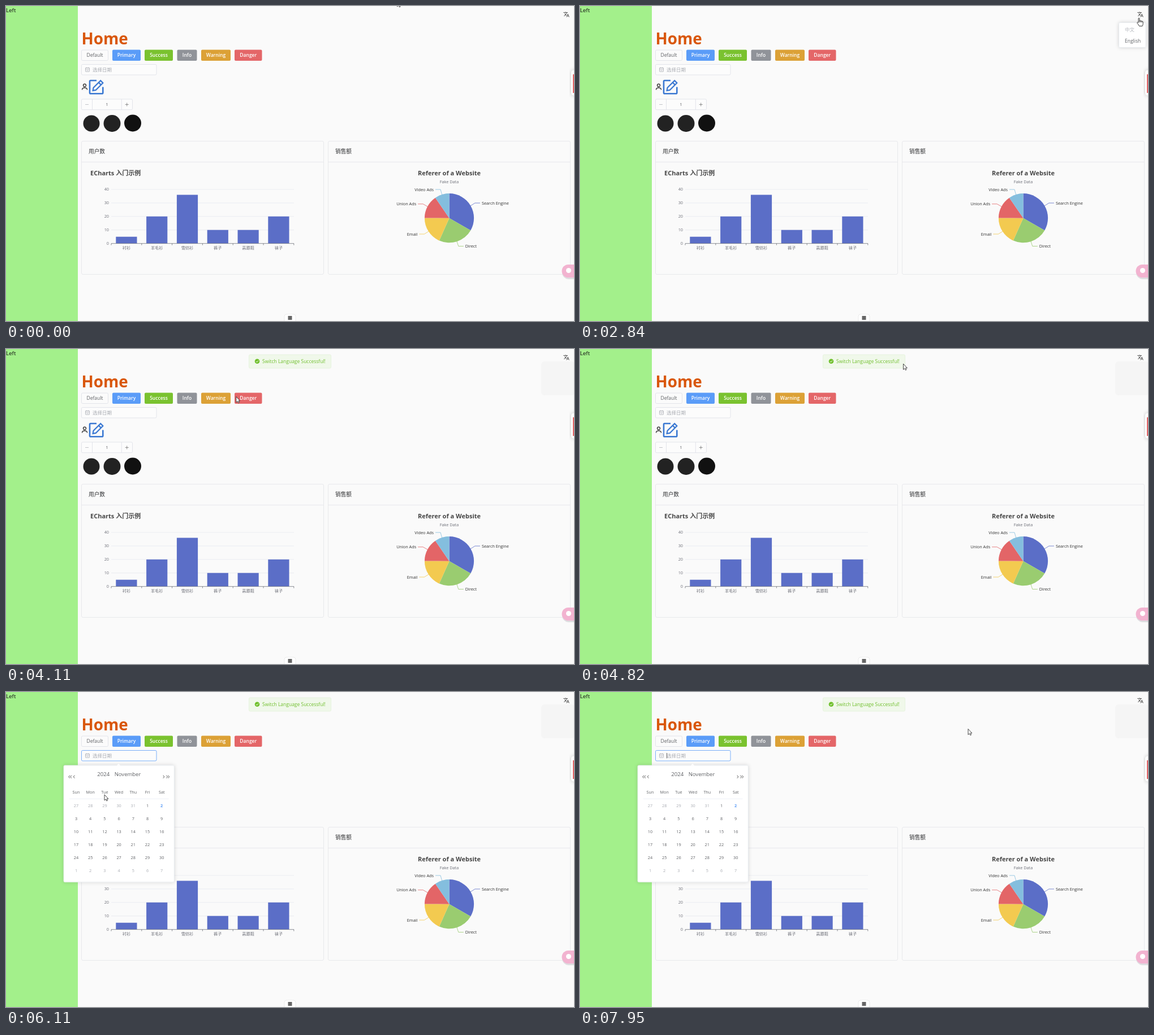
An HTML page that plays this animation: 1004x558 px, repeating every 8000 ms.

```html
<!DOCTYPE html>
<html lang="en">
<head>
<meta charset="utf-8">
<title>Home</title>
<style>
  html, body { margin: 0; width: 100%; height: 100%; overflow: hidden; background: #fafafa; }
  svg { display: block; width: 1004px; height: 558px; }
  text { font-family: "Open Sans", "Noto Sans CJK SC", "Noto Sans CJK", "Noto Sans", sans-serif; white-space: pre; }
</style>
</head>
<body>
<svg id="stage" viewBox="0 0 1004 558" fill="none">
  <defs>
    <filter id="shadow" x="-20%" y="-20%" width="140%" height="140%">
      <feDropShadow dx="0" dy="0" stdDeviation="3" flood-color="#000" flood-opacity=".16"/>
    </filter>
  </defs>
  <g id="page"></g>
  <rect id="trace" x="946" y="22" width="60" height="60" rx="6" fill="#f5f5f5"/>
  <g id="menu"></g>
  <g id="message"></g>
  <path id="caret" d="M153.5 108V117.5" stroke="#444" stroke-width=".8"/>
  <g id="picker"></g>
  <g id="cursor">
    <path id="arrow" d="M.5 .8V11L2.8 8.9 4.4 12 6 11.2 4.5 8.2H7.4Z" fill="#fff" stroke="#333" stroke-width=".9"/>
    <path id="hand" d="M-.9 8V1.2Q-.9 .3 0 .3T1 1.2V5Q2.3 4.4 3.1 5.4 4.4 5 5.2 6 7.2 5.8 7.2 7.5V10.5Q7.2 12.5 6 14.6H.5Q-.8 12-3 9.3-3.5 8-2.4 7.6-1.6 7.4-.9 8.8M1 5V8M3.1 5.4V8M5.2 6V8.3" fill="#fff" stroke="#222" stroke-width=".9"/>
    <path id="beam" d="M-1.5 -5H1.5M0 -5V5M-1.5 5H1.5" stroke="#333" stroke-width=".8"/>
    <g id="denied" stroke="#cf2027" stroke-width="1.5"><circle cx="0" cy="0" r="4.3" fill="#fff"/><path d="M-3 -3L3 3"/></g>
  </g>
</svg>
<script>
const $ = id => document.getElementById(id);
const LOOP = 8000, GREY = '#606266', LINE = '#e4e5e9', BLUE = '#5a9cf8';

// (x, y) is the anchor and the vertical middle of the capitals
const text = (x, y, s, size, fill = GREY, anchor = 'start', weight = 400) =>
  `<text x="${x}" y="${y + size * .36}" font-size="${size}" fill="${fill}" text-anchor="${anchor}" font-weight="${weight}">${s}</text>`;
const rect = (x, y, w, h, fill, stroke = 'none', r = 0, extra = '') =>
  `<rect x="${x}" y="${y}" width="${w}" height="${h}" rx="${r}" fill="${fill}" stroke="${stroke}" stroke-width=".8" ${extra}/>`;
const path = (d, stroke, width = .8, fill = 'none') =>
  `<path d="${d}" stroke="${stroke}" stroke-width="${width}" fill="${fill}"/>`;
const circle = (x, y, r, fill) => `<circle cx="${x}" cy="${y}" r="${r}" fill="${fill}"/>`;

function controls() {
  const buttons = [
    ['Default', 133, 48], ['Primary', 188, 50, BLUE], ['Success', 245, 50, '#7ac22f'],
    ['Info', 302.5, 35, '#909399'], ['Warning', 345, 52, '#dca136'], ['Danger', 404, 48.5, '#e46668']
  ];
  return buttons.map(([s, x, w, c]) =>
      (c ? rect(x, 77.5, w, 19.5, c, 'none', 2) : rect(x + .5, 78, w - 1, 18.5, '#fbfbfb', '#dcdfe6', 2)) +
      text(x + w / 2, 87.4, s, 8.5, c ? '#fff' : GREY, 'middle', c ? 600 : 500)).join('') +
    rect(133.5, 103.5, 132.5, 18.5, '#fcfcfc', '#dcdfe6', 2, 'id="input"') +
    rect(140.5, 109.5, 7, 6.7, 'none', '#a8abb2', .5) +
    path('M140.5 111.8H147.5M142.3 108.5V110M145.7 108.5V110M142 114H146', '#a8abb2', .7) +
    text(153, 112.7, '选择日期', 8.5, '#a8abb2') +
    `<circle cx="139" cy="140.6" r="2.5" stroke="#222" stroke-width="1.2"/>` +
    path('M134.6 148.6V147.7Q135 144.9 139 144.9T143.4 147.7V148.6', '#222', 1.2) +
    path('M160 132H149.5Q148 132 148 133.5V153.8Q148 155.3 149.5 155.3H169.8Q171.3 155.3 171.3 153.8V143.5', '#3a78d2', 2.6) +
    path('M153.6 149.9L154.5 144.8 167.2 132.1 171.3 136.2 158.7 148.9ZM163.8 135.5L167.9 139.6', '#3a78d2', 2.2) +
    rect(133.5, 165, 90, 18.7, '#fcfcfc', '#dcdfe6', 2) +
    path('M152.5 165V183.7M204.3 165V183.7', '#dcdfe6') +
    path('M140 174.5H146', '#b4b7bd') + path('M210.7 174.5H216.7M213.7 171.5V177.5', '#777') +
    text(178.5, 174.6, '1', 8, GREY, 'middle') +
    circle(151, 208, 14.5, '#222') + circle(187.5, 208, 15, '#222') + circle(224, 207.5, 15, '#111');
}

function card(x, title) {
  return rect(x, 239.4, 428, 236, '#fafafa', LINE, 2.5) + path(`M${x} 276.4h428`, LINE) +
    text(x + 12.5, 257.8, title, 9.7, '#303133');
}

function barChart() {
  const bars = [['衬衫', 5], ['羊毛衫', 20], ['雪纺衫', 36], ['裤子', 10], ['高跟鞋', 10], ['袜子', 20]];
  const base = 420.7, unit = 2.395, step = 53.8, left = 186;
  let out = text(149, 296, 'ECharts 入门示例', 11, '#464646', 'start', 700);
  for (let v = 0; v <= 40; v += 10) {
    const y = base - v * unit;
    if (v) out += path(`M${left} ${y}H509`, '#e2e5ec', .7);
    out += text(182, y - .5, v, 7.3, '#6e7079', 'end');
  }
  bars.forEach(([s, v], i) => {
    const x = left + step * (i + .5);
    out += rect(x - 18.6, base - v * unit, 37.2, v * unit, '#5b6ec7') + text(x, 428.3, s, 7.2, '#6e7079', 'middle');
  });
  out += path(`M${left} ${base}H509`, '#6e7079', .8);
  for (let i = 0; i <= bars.length; i++) out += path(`M${left + step * i} ${base}v3`, '#6e7079', .8);
  return out;
}

function pieChart() {
  const cx = 783.5, cy = 375.7, r = 43.6, total = 3147;
  const parts = [
    ['Search Engine', 1048, '#5b6ec7', 349], ['Direct', 735, '#9acc70', 425.5], ['Email', 580, '#f3ca50', 404],
    ['Union Ads', 484, '#e36567', 350.7], ['Video Ads', 300, '#84bede', 325]
  ];
  const at = (a, k) => [cx + Math.sin(a) * k, cy - Math.cos(a) * k].map(n => n.toFixed(2)).join(' ');
  let sum = 0;
  return text(cx, 296, 'Referer of a Website', 11, '#464646', 'middle', 700) +
    text(cx, 311.5, 'Fake Data', 7.3, '#6e7079', 'middle') +
    parts.map(([s, v, c, y]) => {
      const a = sum / total * 2 * Math.PI, b = (sum += v) / total * 2 * Math.PI, mid = (a + b) / 2;
      const side = Math.sin(mid) > 0 ? 1 : -1, knee = cx + Math.sin(mid) * 52.5;
      return path(`M${cx} ${cy}L${at(a, r)}A${r} ${r} 0 0 1 ${at(b, r)}Z`, 'none', 0, c) +
        path(`M${at(mid, r)}L${knee} ${y}h${9 * side}`, c, .8) +
        text(knee + 12 * side, y, s, 7.3, '#333', side > 0 ? 'start' : 'end');
    }).join('');
}

function edges() {
  const glyph = 'M12.87 15.07l-2.54-2.51.03-.03c1.74-1.94 2.98-4.17 3.71-6.53H17V4h-7V2H8v2H1v2h11.17C11.5 7.92 10.44 9.75 9 11.35 8.07 10.32 7.3 9.19 6.69 8h-2c.73 1.63 1.73 3.17 2.98 4.56l-5.09 5.02L4 19l5-5 3.11 3.11zM18.5 10h-2L12 22h2l1.12-3h4.75L21 22h2zm-2.62 7l1.62-4.33L19.12 17z';
  return `<path transform="translate(984.8 9.2) scale(.48)" fill="#555" d="${glyph}"/>` +
    rect(998.5, 113, 12, 46, '#fff', '#ddd', 5, 'filter="url(#shadow)"') + rect(1002, 121, 4, 33, '#e36567') +
    rect(983, 460, 40, 24, '#dedde0', 'none', 12) + rect(982.5, 458, 40, 23, '#f2b3d0', 'none', 11.5) +
    circle(994.5, 468.5, 4.5, '#fff') +
    rect(492, 546, 20, 20, '#fff', '#e6e6e6', 4) + rect(498.5, 549, 7, 7, '#666');
}

function calendar() {
  const colX = i => 124 + 25.2 * i;
  let out = rect(102, 130, 195.3, 206.7, '#fff', '#e4e7ed', 2, 'filter="url(#shadow)"') +
    path('M195.5 130.4L199 127 202.5 130.4', 'none', 0, '#fff') +
    text(172.3, 146, '2024', 9.7, GREY, 'middle', 500) + text(215, 146, 'November', 9.5, GREY, 'middle', 500) +
    path('M112.8 147.7l-2 2.5 2 2.5M115.8 147.7l-2 2.5 2 2.5M121.3 147.7l-2 2.5 2 2.5' +
      'M277.8 147.7l2 2.5-2 2.5M283.6 147.7l2 2.5-2 2.5M286.6 147.7l2 2.5-2 2.5', '#444', .9) +
    path('M112 189.3H287.5', '#ebeef5');
  ['Sun', 'Mon', 'Tue', 'Wed', 'Thu', 'Fri', 'Sat'].forEach((s, i) =>
    out += text(colX(i), 177, s, 7.2, GREY, 'middle'));
  for (let i = 0; i < 42; i++) {
    const d = i - 4, inside = d > 0 && d < 31, today = d === 2;
    out += text(colX(i % 7), 201.2 + 23 * Math.floor(i / 7), d < 1 ? d + 31 : inside ? d : d - 30, 7.3,
      today ? BLUE : inside ? GREY : '#a8abb2', 'middle', today ? 700 : 400);
  }
  return out;
}

$('page').innerHTML = rect(0, 0, 1004, 558, '#fafafa') + rect(0, 0, 127, 558, '#a3f08b') +
  text(0, 7.2, 'Left', 9.8, '#111') + text(133.5, 57.8, 'Home', 27.8, '#d9570b', 'start', 700) +
  controls() + card(133.5, '用户数') + card(569.5, '销售额') + barChart() + pieChart() + edges();
$('menu').innerHTML = rect(952.5, 29.5, 47.5, 44, '#fff', '#e4e7ed', 2, 'filter="url(#shadow)"') +
  text(963, 42, '中文', 8.5, '#b4b7bd') + text(963, 61.5, 'English', 8.5);
$('message').innerHTML = rect(429.5, 10, 145, 24, '#f0f8ea', '#e3f2d8', 2) + circle(444, 21.8, 4.3, '#6fbf2c') +
  path('M441.9 21.9L443.5 23.4 446.2 20.4', '#fff', 1) +
  text(453, 21.9, 'Switch Language Successful!', 8.5, '#6fbf2c');
$('picker').innerHTML = calendar();

// Pointer path: time, x, y
const route = [
  [0, 691, -10], [690, 691, -10], [750, 705, 38], [800, 717, 64], [880, 725, 86], [1000, 812, 79], [1080, 894, 66],
  [1150, 955.5, 57], [1170, 955.5, 57], [1300, 1006, 16], [1530, 1006, 14], [1870, 988, 13.5], [2620, 988, 13.5],
  [2820, 988, 21], [2870, 988, 21], [3280, 976, 61], [3320, 975.5, 63.3], [3700, 975.5, 63.3], [3780, 880, 75],
  [3930, 516, 102], [4000, 432, 102], [4110, 406, 84], [4240, 446, 38], [4340, 446, 30], [4420, 450, 29],
  [4810, 571, 25.5], [5000, 571, 25.5], [5400, 230, 112], [5800, 200, 114], [6100, 173.5, 181], [6130, 173.5, 181],
  [6400, 225, 230], [6650, 215, 160], [6790, 215, 160], [7080, 255, 150], [7300, 132, 150], [7540, 196, 165],
  [7590, 196, 165], [7640, 394, 138], [7690, 648, 77], [7730, 673, 67], [7780, 685, 64.5], [7940, 685, 64.5],
  [7960, 686, 64.8], [8000, 686, 64.8]
];

function pointerAt(t) {
  const i = route.findIndex(p => p[0] > t), [t0, x0, y0] = route[i - 1], [t1, x1, y1] = route[i];
  const k = (t - t0) / (t1 - t0);
  return [x0 + (x1 - x0) * k, y0 + (y1 - y0) * k];
}

const ramp = (t, from, to) => Math.min(1, Math.max(0, (t - from) / (to - from)));
const easeOut = k => 1 - (1 - k) ** 2;
const show = (id, on) => $(id).style.display = on ? '' : 'none';

function draw(t) {
  const [x, y] = pointerAt(t);
  const kind = t >= 1600 && t < 3600 ? 'hand' : t >= 3600 && t < 3720 ? 'denied' :
    t > 5300 && t < 5900 && x < 266 && y > 103 && y < 122 ? 'beam' : 'arrow';
  for (const id of ['arrow', 'hand', 'beam', 'denied']) show(id, id === kind);
  $('cursor').setAttribute('transform', `translate(${x} ${y})`);

  $('menu').setAttribute('opacity', ramp(t, 2500, 2740) * (1 - ramp(t, 3560, 3680)));
  show('trace', t >= 3570);

  const slide = easeOut(ramp(t, 3600, 3950));
  $('message').setAttribute('opacity', slide);
  $('message').setAttribute('transform', `translate(0 ${-24 * (1 - slide)})`);

  const open = easeOut(ramp(t, 5520, 5770));
  $('picker').setAttribute('opacity', open);
  $('picker').setAttribute('transform', `translate(0 ${127 * (1 - open)}) scale(1 ${open})`);
  $('input').setAttribute('stroke', t >= 5500 ? BLUE : '#dcdfe6');
  show('caret', t >= 5600 && Math.floor((t - 5600) / 500) % 2 === 0);
}

function tick() {
  draw(performance.now() % LOOP);
  requestAnimationFrame(tick);
}
tick();
</script>
</body>
</html>
```
